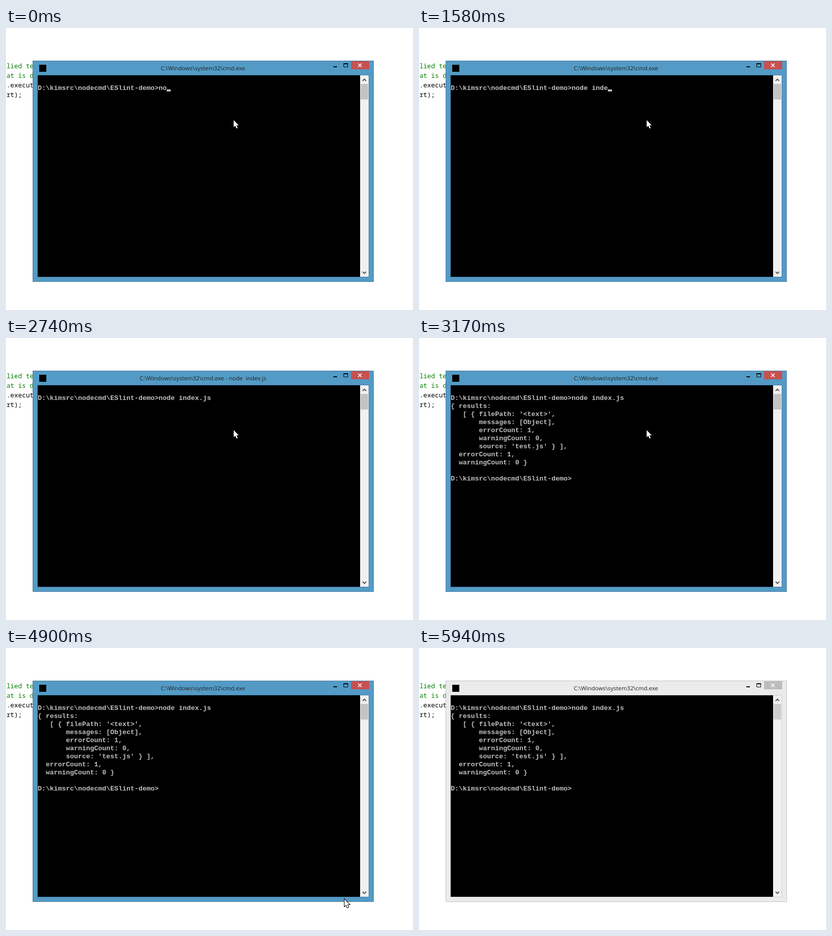
An HTML page for the animation above (6070 ms loop, 808x560 px).

```html
<!DOCTYPE html>
<html lang="en">
<head>
<meta charset="utf-8">
<title>Console</title>
<style>
  html, body { margin: 0; width: 100%; height: 100%; overflow: hidden; background: #fff; }
  svg { display: block; }
  text { white-space: pre; }
  .editor { font: 12.83px "Noto Sans Mono", monospace; }
  .title { font: 11.5px "Open Sans", sans-serif; text-anchor: middle; fill: #222; }
  .console { font: bold 13.333px "Liberation Mono", monospace; fill: #c0c0c0; }
  #win { --frame: #539bc6; --edge: #447fa5; --close: #c75050; --thumb: #c3c3c3; }
  #win.inactive { --frame: #ebebeb; --edge: #d0d0d0; --close: #bcbcbc; --thumb: #cdcdcd; }
  .frame { fill: var(--frame); stroke: var(--edge); }
  .close { fill: var(--close); }
  .thumb { fill: var(--thumb); }
  .line { fill: none; }
</style>
</head>
<body>
<svg width="808" height="560" viewBox="0 0 808 560">
  <g class="editor">
    <g fill="#008000">
      <text x="-6.8" y="80">plied te</text>
      <text x="-6.8" y="99">hat is d</text>
    </g>
    <text x="-6.8" y="118">l.execut</text>
    <text x="-6.8" y="137">ort);</text>
  </g>

  <g id="win">
    <rect x="52.5" y="64.5" width="678" height="440" class="line" stroke="#000" stroke-opacity=".08"/>
    <rect x="53.5" y="65.5" width="676" height="438" class="frame"/>
    <rect x="62.5" y="93.5" width="658" height="401" class="frame"/>
    <rect x="66" y="73" width="14" height="14"/>
    <text id="title" class="title" x="391" y="84"></text>

    <path d="M650 76h7v2h-7z"/>
    <path class="line" stroke="#000" d="M670.5 71v6.5h8V71"/>
    <path d="M670 70h9v2h-9z"/>
    <rect class="close" x="685" y="66" width="36" height="16"/>
    <path class="line" stroke="#fff" stroke-width="1.6" d="M699 70.5l7 7m0-7l-7 7"/>

    <rect x="63" y="94" width="640" height="400"/>
    <rect x="703" y="94" width="17" height="400" fill="#f0f0f0"/>
    <rect class="thumb" x="704" y="111" width="15" height="31"/>
    <path class="line" stroke="#505050" stroke-width="1.8" d="M708 105l3.5-3.5 3.5 3.5M708 484l3.5 3.5 3.5-3.5"/>
  </g>

  <g id="rows" class="console"></g>
  <rect id="caret" width="8" height="4" fill="#c0c0c0"/>
  <path id="mouse" fill="#fff" stroke="#000" stroke-width="2" paint-order="stroke"
        d="M0 0V14L3.2 11 5.6 16.5 8 15.5 5.6 10.3H10z"/>
</svg>

<script>
const LOOP = 6070, ENTER = 2740, DONE = 3170, IDLE = 4170, BLUR = 5940;
const BLINK = 510, BLINK_START = 40;
const MOVE = 4450, MOVE_STEP = 150;
const PROMPT = "D:\\kimsrc\\nodecmd\\ESlint-demo>";
const COMMAND = "node index.js";
const SHELL = "C:\\Windows\\system32\\cmd.exe";
const OUTPUT = `{ results:
   [ { filePath: '<text>',
       messages: [Object],
       errorCount: 1,
       warningCount: 0,
       source: 'test.js' } ],
  errorCount: 1,
  warningCount: 0 }

`.split("\n").slice(0, -1).concat(PROMPT);

// Typing rhythm after the two letters already there, and the pointer's way out.
const keys = [280, 540, 670, 940, 1210, 1460, 1560, 1890, 2190, 2340, 2470];
const path = [[452, 183], [536, 254], [632, 409], [672, 499]];

const $ = id => document.getElementById(id);
const show = (el, on) => el.setAttribute("visibility", on ? "visible" : "hidden");
const place = (el, x, y) => el.setAttribute("transform", `translate(${x} ${y})`);
const setText = (el, s) => { if (el.textContent !== s) el.textContent = s; };

const rows = [PROMPT, ...OUTPUT].map((_, i) => {
  const row = document.createElementNS("http://www.w3.org/2000/svg", "text");
  row.setAttribute("x", 63);
  row.setAttribute("y", 123 + 16 * i);
  return $("rows").appendChild(row);
});

// A key press hides the caret until the next blink; at rest it alternates.
function caretOn(t, pressed) {
  if (t >= IDLE) return Math.floor((t - IDLE) / BLINK) % 2 === 0;
  const blink = t - (t - BLINK_START + BLINK) % BLINK;
  return t < ENTER && !pressed.some(k => k >= blink);
}

function draw(t) {
  const pressed = keys.filter(k => k <= t);
  const done = t >= DONE;
  const lines = [PROMPT + COMMAND.slice(0, 2 + pressed.length), ...(done ? OUTPUT : [])];
  const last = lines.length - 1;

  rows.forEach((row, i) => setText(row, lines[i] || ""));
  place($("caret"), 63 + 8 * lines[last].length, 122 + 16 * last);
  show($("caret"), caretOn(t, pressed));

  const pos = path[Math.max(0, Math.floor((t - MOVE) / MOVE_STEP))];
  show($("mouse"), pos);
  if (pos) place($("mouse"), ...pos);

  setText($("title"), t >= ENTER && !done ? SHELL + " - node  index.js" : SHELL);
  $("win").classList.toggle("inactive", t >= BLUR);
}

const start = performance.now();
function tick() {
  draw((performance.now() - start) % LOOP);
  requestAnimationFrame(tick);
}
tick();
</script>
</body>
</html>
```
